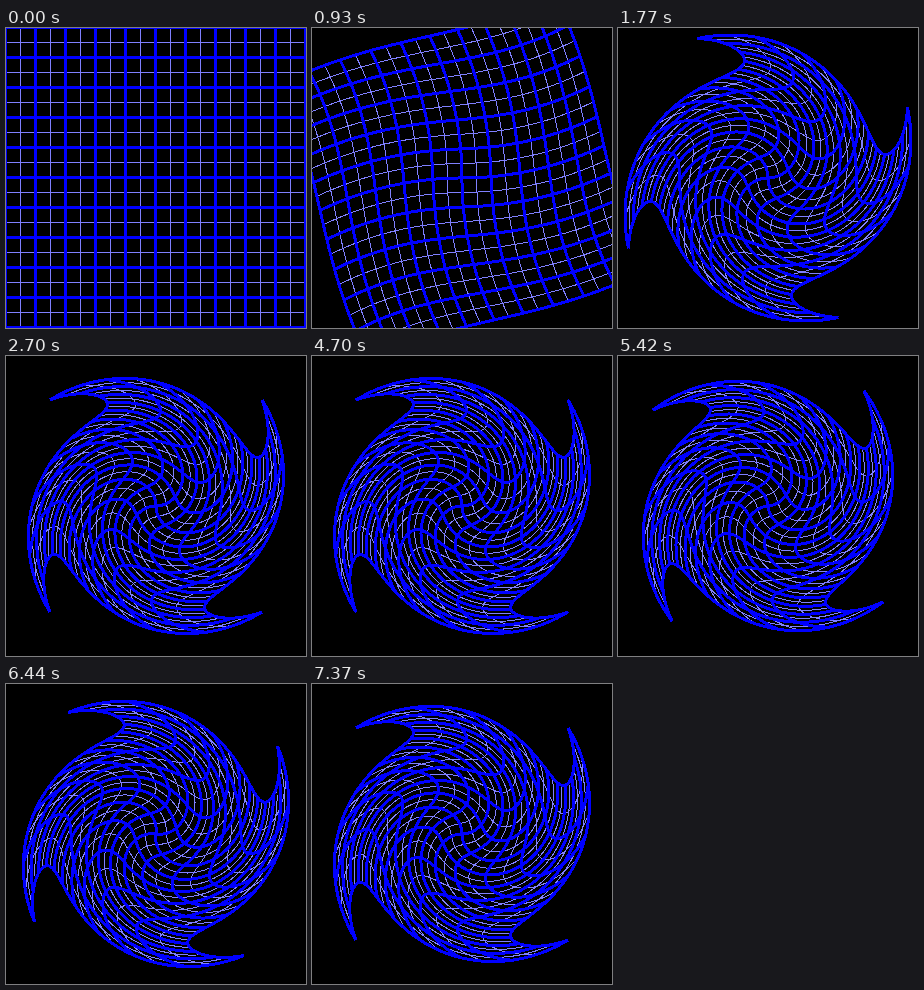
An HTML page that plays this animation: 300x300 px, repeating every 8000 ms.

```html
<!DOCTYPE html>
<html>
<head>
<meta charset="utf-8">
<title>Twisting grid</title>
<style>
  html, body { margin: 0; width: 100%; height: 100%; overflow: hidden; background: #000; }
  svg { display: block; width: 100vw; height: 100vh; }
  path { fill: none; stroke-linejoin: round; shape-rendering: crispEdges; }
</style>
</head>
<body>
<svg viewBox="0 0 300 300">
  <rect width="300" height="300" fill="#000"/>
  <path id="thin" stroke="#8080ff" stroke-width="1"/>
  <path id="thick" stroke="#0000ff" stroke-width="3"/>
</svg>
<script>
const LOOP = 8000, STEP = 30, STEPS = 90, SPIN_START = 4700;
// Just under 150, so that straight lines snap to the pixels on their upper left.
const HALF = 150, CENTER = 149.98, CORNER = HALF * Math.SQRT2;
const SAMPLES = 100, STEEP = 14;
const thin = document.getElementById('thin');
const thick = document.getElementById('thick');

const clamp = p => Math.min(1, Math.max(0, p));
const ease = p => 0.5 + Math.atan(STEEP * (p - 0.5)) / (2 * Math.atan(STEEP / 2));

// Turn each point by an angle proportional to its radius, then shrink.
function warp(x, y, twist, spin) {
  const a = -(Math.PI * twist * Math.hypot(x, y) / CORNER + spin);
  const s = 1 + (Math.SQRT1_2 - 1) * twist;
  const c = Math.cos(a) * s, d = Math.sin(a) * s;
  return (CENTER + x * c - y * d).toFixed(2) + ' ' + (CENTER + x * d + y * c).toFixed(2);
}

function gridPath(first, twist, spin) {
  let d = '';
  for (let at = first; at <= HALF; at += 30) {
    const across = [], down = [];
    for (let i = 0; i <= SAMPLES; i++) {
      const v = (2 * i / SAMPLES - 1) * HALF;
      across.push(warp(v, at, twist, spin));
      down.push(warp(at, v, twist, spin));
    }
    d += 'M' + across.join('L') + 'M' + down.join('L');
  }
  return d;
}

function draw(t) {
  const twist = ease(clamp(Math.floor(t / STEP) / STEPS));
  const turn = ease(clamp((Math.floor((t - SPIN_START) / STEP) + 1) / STEPS));
  const spin = turn * Math.PI / 2;
  thin.setAttribute('d', gridPath(-HALF + 15, twist, spin));
  thick.setAttribute('d', gridPath(-HALF, twist, spin));
}

const start = performance.now();
function tick() {
  draw((performance.now() - start) % LOOP);
  requestAnimationFrame(tick);
}
tick();
</script>
</body>
</html>
```
